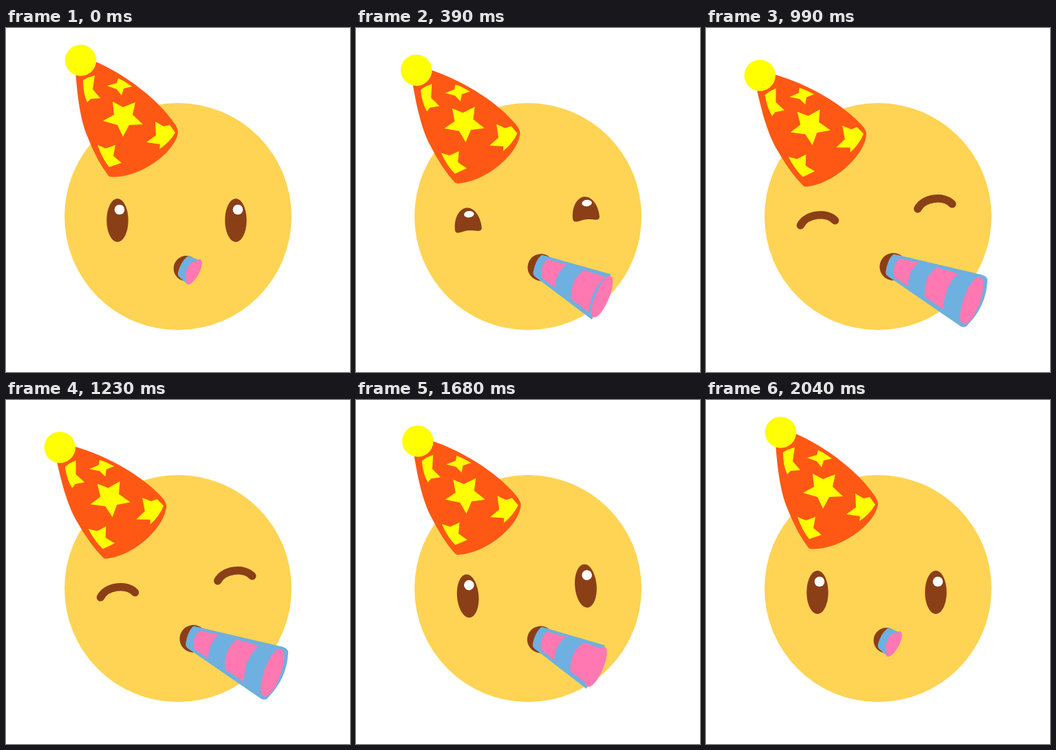
These frames come from a looping animation (500 px wide and 500 px high, 2.7 s). An HTML page:

```html
<!DOCTYPE html>
<html lang="en">
<head>
<meta charset="utf-8">
<title>Party face</title>
<style>
  html, body { margin: 0; width: 100%; height: 100%; overflow: hidden; background: #fff; }
  svg { display: block; width: 100%; height: 100%; }
  .brown { fill: #8b3f17; }
  .pink { fill: #ff78b1; }
  .blue { fill: #6eb0e0; }
  .yellow { fill: #ff0; }
  .white { fill: #fff; }
  .lash { fill: none; stroke: #8b3f17; stroke-linecap: round; }
</style>
</head>
<body>
<svg viewBox="0 0 500 500">
  <defs>
    <clipPath id="reveal"><rect id="window" x="-400" y="-120" height="240"/></clipPath>
  </defs>
  <circle cx="250" cy="274" r="165" fill="#ffd454"/>
  <g id="features">
    <g class="eye" transform="translate(162 0)"></g>
    <g class="eye" transform="translate(334 0)"></g>

    <circle id="mouth" class="brown" cx="262" cy="349.4"/>
    <g id="horn">
      <g clip-path="url(#reveal)">
        <path class="blue" d="M267 332L387 378.5Q396 382 394.5 389Q387.4 424.6 358 447.5Q353 453 347 449L252 362Q249 359 250 355Q254 340 263 332.500Q265 331 267 332Z"/>
        <path class="pink" d="M272.200 338.700L299.100 348.600Q280.700 360.500 279.400 381.100L261.500 364.500Q259.500 348.500 272.200 338.700Z"/>
        <path class="pink" d="M323.900 359.100L354.300 372.500Q331 387.300 325.300 420.900L301 399.300Q302.500 370.800 323.900 359.100Z"/>
      </g>
      <path id="opening" class="pink"/>
    </g>

    <path fill="#ff5815" d="M101 62C104 105 109 135 118 157Q132 193 149 215Q151 217 157 216.500C198 216 246 180 250 152Q250 146 245 139C225 109 180 70 126 47Z"/>
    <g class="yellow">
      <path d="M155 107L170 115L188 108L184 126L199 140L179 141L170 158L162 141L141 135L157 126Z"/>
      <path d="M112 76L119 72L129 69L126 89L137 102L123 103L118 108Q112 95 112 76Z"/>
      <path d="M147 84L161 80L163 73L171 77L183 85L171 88L168 98L161 89Z"/>
      <path d="M217 136L229 143L238 141L246 152Q238 166 223 176L224 169L204 166L218 156Z"/>
      <path d="M133 170L145 175L159 170L156 186L168 196L150 202Q140 190 133 170Z"/>
      <circle cx="108.500" cy="47" r="22.700"/>
    </g>
  </g>
</svg>
<script>
const LOOP = 2700, STEP = 30;
const byId = id => document.getElementById(id);
const mix = (a, b, k) => a + (b - a) * k;
const clamp = x => Math.min(1, Math.max(0, x));
const ease = x => (x = clamp(x), x * x * (3 - 2 * x));

// Rises from step 0, falls back to rest at step 68.
const swell = (step, length) => Math.min(ease(step / length), ease((68 - step) / length));

const eyes = [...document.querySelectorAll('.eye')].map(group => {
  group.innerHTML = '<g><path class="brown"/><path class="lash"/><ellipse class="white" cx="3"/></g>';
  const [body, lash, shine] = group.firstChild.children;
  return { shift: group.firstChild, body, lash, shine };
});

// Lid positions: open, dome, slit, shut.
const lids = [
  { half: 15.7, side: 279.5, top: 248, up: 17.4, topX: 8.7, down: 17.4, lowX: 8.7, low: 311, shineY: 264, shineR: 7.3, span: 15, end: 285, arch: 285, stroke: 0 },
  { half: 19.5, side: 285.5, top: 255.4, up: 16, topX: 11, down: 9, lowX: 10, low: 288.5, shineY: 265, shineR: 4.7, span: 15, end: 285, arch: 280, stroke: 0 },
  { half: 19.5, side: 273.5, top: 256, up: 10, topX: 11, down: 5, lowX: 10, low: 273.5, shineY: 260, shineR: 2.6, span: 15.5, end: 273.5, arch: 266, stroke: 8 },
  { half: 18, side: 266, top: 258.5, up: 3, topX: 10, down: 1, lowX: 10, low: 267, shineY: 260, shineR: 0, span: 25.3, end: 274.5, arch: 259.5, stroke: 11.5 }
];
const lidKeys = [[0, 0], [6, 0], [13, 1], [15.5, 2], [18.5, 3], [45, 3], [48, 2], [50, 1], [56, 0], [90, 0]];

function keyed(keys, at) {
  const i = keys.findIndex(([time]) => time > at);
  const [t0, v0] = keys[i - 1], [t1, v1] = keys[i];
  return mix(v0, v1, (at - t0) / (t1 - t0));
}

function drawEyes(step, turn) {
  const level = keyed(lidKeys, step), i = Math.min(2, Math.floor(level));
  const p = {};
  for (const key in lids[0]) p[key] = mix(lids[i][key], lids[i + 1][key], level - i);
  const { half: h, side: s, topX: x, lowX: w } = p;
  const body = `M${-h} ${s}C${-h} ${s - p.up} ${-x} ${p.top} 0 ${p.top}` +
    `C${x} ${p.top} ${h} ${s - p.up} ${h} ${s}` +
    `C${h} ${s + p.down} ${w} ${p.low} 0 ${p.low}` +
    `C${-w} ${p.low} ${-h} ${s + p.down} ${-h} ${s}Z`;
  const lash = `M${-p.span} ${p.end}C${-p.span * .58} ${p.arch} ${p.span * .58} ${p.arch} ${p.span} ${p.end}`;
  for (const eye of eyes) {
    eye.shift.setAttribute('transform', `translate(0 ${-3.5 * turn})`);
    eye.body.setAttribute('d', body);
    eye.lash.setAttribute('d', lash);
    eye.lash.setAttribute('stroke-width', p.stroke);
    eye.shine.setAttribute('cy', p.shineY);
    eye.shine.setAttribute('rx', 7.3);
    eye.shine.setAttribute('ry', p.shineR);
  }
}

function drawHorn(step) {
  const out = swell(step, 19);
  const front = `translate(${mix(273, 368, out)} ${mix(354.5, 413.8, out)}) rotate(28)`;
  const long = mix(20.4, 36.2, out);
  const back = -(6 + 6 * out ** 3) * 4 / 3, fore = mix(7.5, 12, out) * 4 / 3;
  byId('opening').setAttribute('transform', front);
  byId('opening').setAttribute('d',
    `M0 ${-long}C${fore} ${-long} ${fore} ${long} 0 ${long}C${back} ${long} ${back} ${-long} 0 ${-long}Z`);
  byId('window').setAttribute('transform', front);
  byId('window').setAttribute('width', 400 + 40 * clamp((out - .8) / .2));

  const blowing = step >= 21 && step <= 51;
  const puff = blowing ? 1 + .005 * (1 - Math.cos((step - 21) * Math.PI / 3)) : 1;
  byId('horn').setAttribute('transform', `translate(262 350) scale(${puff}) translate(-262 -350)`);
  byId('mouth').setAttribute('r', mix(18.4, 20, out));
}

function render(time) {
  const step = Math.floor(time % LOOP / STEP);
  const turn = swell(step, 21);
  byId('features').setAttribute('transform', `rotate(${-8 * turn} 250 274)`);
  drawEyes(step, turn);
  drawHorn(step);
}

const start = performance.now();
function tick() {
  render(performance.now() - start);
  requestAnimationFrame(tick);
}
tick();
</script>
</body>
</html>
```
